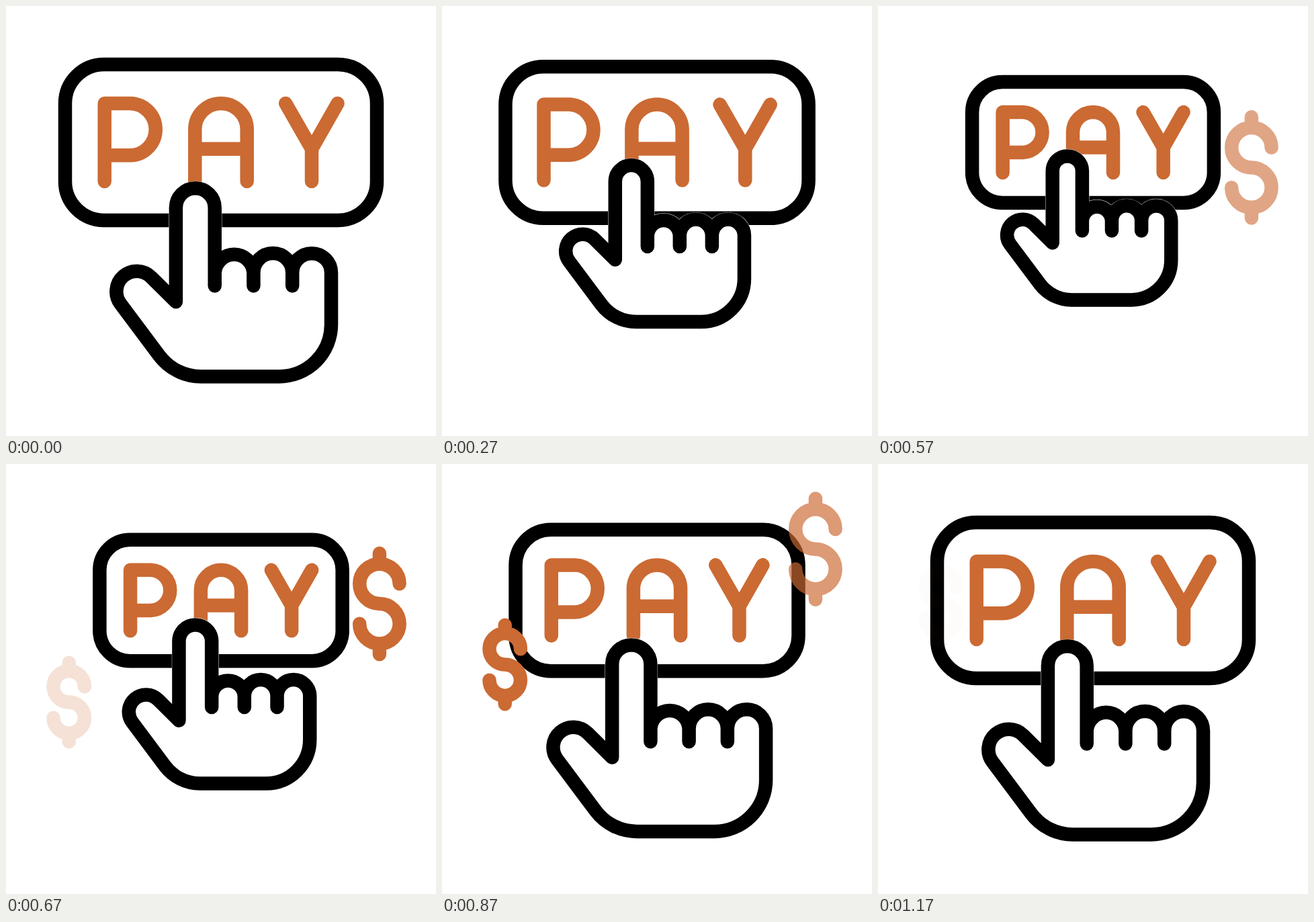
Write an HTML page that moves like this. It is 640 px wide and 640 px high and loops after 1.4 s.

```html
<!DOCTYPE html>
<html lang="en">
<head>
<meta charset="utf-8">
<title>Pay button</title>
<style>
  html, body { margin: 0; width: 100%; height: 100%; overflow: hidden; background: #fff; }
  svg { display: block; width: 100%; height: 100%; }
  path, rect { fill: none; stroke-linecap: round; stroke-linejoin: round; }
  .ink { stroke: #000; }
  .accent { stroke: #cb6a33; }
  #hand path { fill: #fff; }
</style>
</head>
<body>
<svg viewBox="0 0 640 640">
  <g id="button">
    <rect class="ink" x="88" y="87" width="464" height="232" rx="58"/>
    <path class="accent" d="M146.7 261V145H185.3A38.67 38.67 0 0 1 185.3 222.3H146.7
      M281.3 261V183.7A38.67 38.67 0 0 1 358.7 183.7V261M281.3 212.7H358.7
      M416.2 145L455 212.7L493.5 145M455 212.7V261"/>
  </g>
  <g id="hand">
    <path id="rim" stroke="#fff"/>
    <path id="outline" class="ink"/>
  </g>
  <g id="coinR"><path class="accent"/></g>
  <g id="coinL"><path class="accent"/></g>
</svg>
<script>
const LINE = 20.5, LOOP = 1400, FPS = 30, LAST = 35;
const $ = id => document.getElementById(id);
const clamp = v => Math.max(0, Math.min(1, v));
const ease = v => (1 - Math.cos(Math.PI * clamp(v))) / 2;

// 0 to 1 between a and b, back to 0 at c
const press = (n, a, b, c) => n < b ? ease((n - a) / (b - a)) : ease((c - n) / (c - b));

const knuckle = x => `A28.9 28.9 0 0 1 ${x} 397`;
const handPath = 'M252.9 440.2V300.2A28.9 28.9 0 0 1 310.7 300.2V416.6V397' +
  knuckle(368.4) + 'V416.6V397' + knuckle(426.2) + 'V416.6V397' + knuckle(484) +
  'V474A77.4 77.4 0 0 1 406.6 551.4H290A77.4 77.4 0 0 1 228.1 520.4' +
  'L170.5 443.3A30.3 30.3 0 0 1 216.2 403.7Z';
$('rim').setAttribute('d', handPath);
$('outline').setAttribute('d', handPath);

const dollar = r => {
  const arc = (sweep, x, y) => `A${r} ${r} 0 1 ${sweep} ${x} ${y}`;
  const top = 2 * r, tip = 2.53 * r;
  return `M${r} ${-r}` + arc(0, 0, 0) + arc(1, -r, r) +
    `M0 ${-top}V${-tip}M0 ${top}V${tip}`;
};

const coins = [
  { el: $('coinR'), r: 29.7, x: 555.9, y: 252.5, rise: 152, start: 14 },
  { el: $('coinL'), r: 23.2, x: 93.7, y: 355.8, rise: 150, start: 19 }
];
for (const c of coins) {
  c.el.firstElementChild.setAttribute('d', dollar(c.r));
  c.el.setAttribute('stroke-width', LINE);
}

// Scales a group about a point while its lines keep their weight
function scale(el, s, x, y) {
  el.setAttribute('transform', `translate(${x} ${y}) scale(${s}) translate(${-x} ${-y})`);
  el.setAttribute('stroke-width', LINE / s);
}

function draw(ms) {
  const n = Math.min(LAST, Math.floor(ms * FPS / 1000 + 0.15));
  scale($('button'), 1 - 0.23 * press(n, 5, 18.3, 32), 320, 203);
  const s = 1 - 0.27 * press(n, 0, 13.8, 27.65);
  scale($('hand'), s, 281.8, 68.3);
  $('rim').setAttribute('stroke-width', (LINE + 0.8) / s);
  for (const c of coins) {
    const p = n - c.start;
    const y = c.y - c.rise * ease(p / 16.5);
    c.el.setAttribute('transform', `translate(${c.x} ${y})`);
    c.el.setAttribute('opacity', Math.min(clamp(p / 5), clamp((16.12 - p) / 6.1)));
  }
}

const begin = performance.now();
function tick() {
  draw((performance.now() - begin) % LOOP);
  requestAnimationFrame(tick);
}
tick();
</script>
</body>
</html>
```
